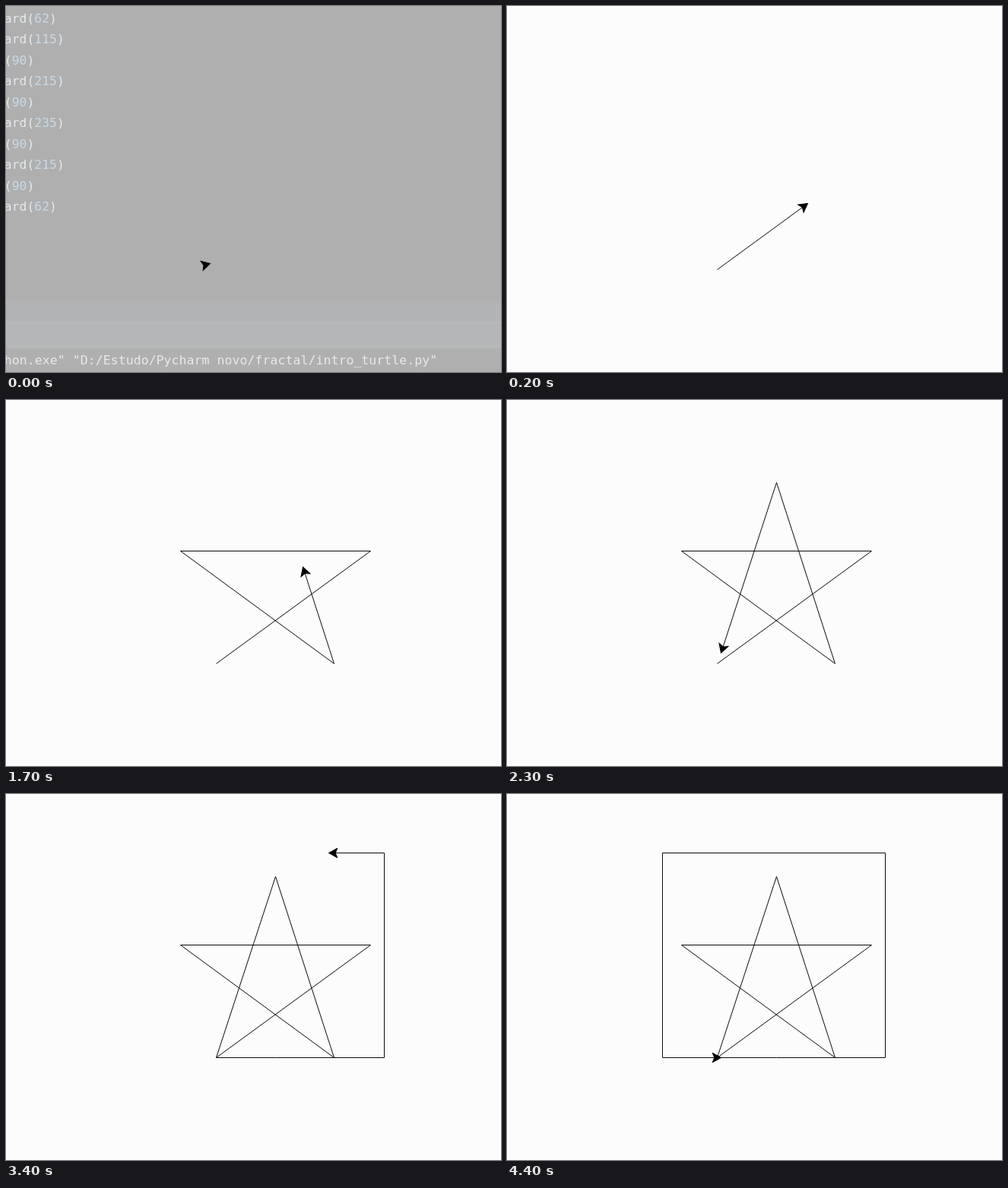
An HTML page for the animation above (4.6 s loop, 651 by 481 pixels).

```html
<!DOCTYPE html>
<html lang="en">
<head>
<meta charset="utf-8">
<title>Turtle star</title>
<style>
  html, body { margin: 0; width: 100%; height: 100%; overflow: hidden; background: #fcfcfc; }
  svg { display: block; width: 651px; height: 481px; }
  text { font-family: "DejaVu Sans Mono", "Noto Sans Mono", monospace; font-size: 16.4px; fill: #c0cad4; white-space: pre; }
  .num { fill: #6f9ec2; }
  .console { font-size: 16.6px; fill: #cacaca; }
  #trail { fill: none; stroke: #0a0a0a; }
  #arrow { fill: #000; stroke: #000; }
</style>
</head>
<body>
<svg viewBox="0 0 651 481">
  <g id="editor">
    <rect width="651" height="481" fill="#2b2b2b"/>
    <rect y="387" width="651" height="29" fill="#333639"/>
    <rect y="416" width="651" height="34" fill="#3c3f41"/>
    <rect y="415" width="651" height="1" fill="#4a4a4a"/>
    <g id="code"></g>
    <text class="console" x="-2.2" y="471">hon.exe" "D:/Estudo/Pycharm novo/fractal/intro_turtle.py"</text>
  </g>
  <rect id="veil" width="651" height="481" fill="#fcfcfc"/>
  <g id="drawing">
    <polyline id="trail"/>
    <polygon id="arrow" points="0,0 -11.25,-6.25 -8.75,0 -11.25,6.25"/>
  </g>
</svg>
<script>
  const $ = id => document.getElementById(id);
  const LOOP = 4600, TICK = 100, SCALE = 1.25;
  const HOME = { x: 276.6, y: 346.1 };

  // Code lines visible behind the opening window
  const lines = ["ard(62)", "ard(115)", "(90)", "ard(215)", "(90)",
                 "ard(235)", "(90)", "ard(215)", "(90)", "ard(62)"];
  $("code").innerHTML = lines.map((line, i) =>
    `<text x="-2.2" y="${22 + i * 27.45}">` +
    line.replace(/\d+/, '<tspan class="num">$&</tspan>') + "</text>").join("");

  // The turtle program, each move split into equal steps
  const left = angle => ({ angle, steps: 1 + Math.floor(angle / 9) });
  const forward = dist => ({ dist, steps: 1 + Math.floor(dist / 11.979) });
  const program = [left(36), forward(200)];
  for (let i = 0; i < 4; i++) program.push(left(144), forward(200));
  program.push(left(108), forward(62), forward(115));
  for (const side of [215, 235, 215, 62]) program.push(left(90), forward(side));

  // Steps completed at given ticks
  const pace = [[0, 2], [10, 70.3], [12, 82.5], [23, 157.5], [30, 204.5], [34, 232.5],
                [36, 245.5], [42, 287.5], [43, 292.5], [44, 299]];
  function stepsAt(tick) {
    const i = pace.findIndex(([t]) => t >= tick);
    if (i <= 0) return pace[0][1];
    const [t0, n0] = pace[i - 1], [t1, n1] = pace[i];
    return Math.floor(n0 + (n1 - n0) * (tick - t0) / (t1 - t0));
  }

  // Turtle units are whole before scaling; lines sit on pixel centres
  const snap = (home, units) => Math.floor(home + Math.round(units) * SCALE) + 0.5;

  function run(steps) {
    let x = 0, y = 0, heading = 0;
    const path = [];
    const mark = () => path.push([snap(HOME.x, x), snap(HOME.y, y)]);
    mark();
    for (const move of program) {
      if (steps <= 0) break;
      const part = Math.min(1, steps / move.steps);
      if (move.angle) {
        heading += move.angle * part;
      } else {
        const a = heading * Math.PI / 180, d = move.dist * part;
        x += d * Math.cos(a);
        y -= d * Math.sin(a);
        mark();
      }
      steps -= move.steps;
    }
    return { path, heading };
  }

  // Window opening: opacity and offset per tick
  const opening = [{ alpha: 0.63, shift: -8 }, { alpha: 0.923, shift: -2 }];
  const opened = { alpha: 1, shift: 0 };

  let shown = -1;
  function draw(tick) {
    const { alpha, shift } = opening[tick] || opened;
    const { path, heading } = run(stepsAt(tick));
    $("veil").setAttribute("opacity", alpha);
    $("drawing").setAttribute("transform", `translate(${shift} ${shift})`);
    $("trail").setAttribute("points", path.join(" "));
    $("arrow").setAttribute("transform", `translate(${path[path.length - 1]}) rotate(${-heading})`);
  }

  function frame() {
    const tick = Math.min(44, Math.floor(performance.now() % LOOP / TICK));
    if (tick !== shown) draw(shown = tick);
    requestAnimationFrame(frame);
  }
  frame();
</script>
</body>
</html>
```
